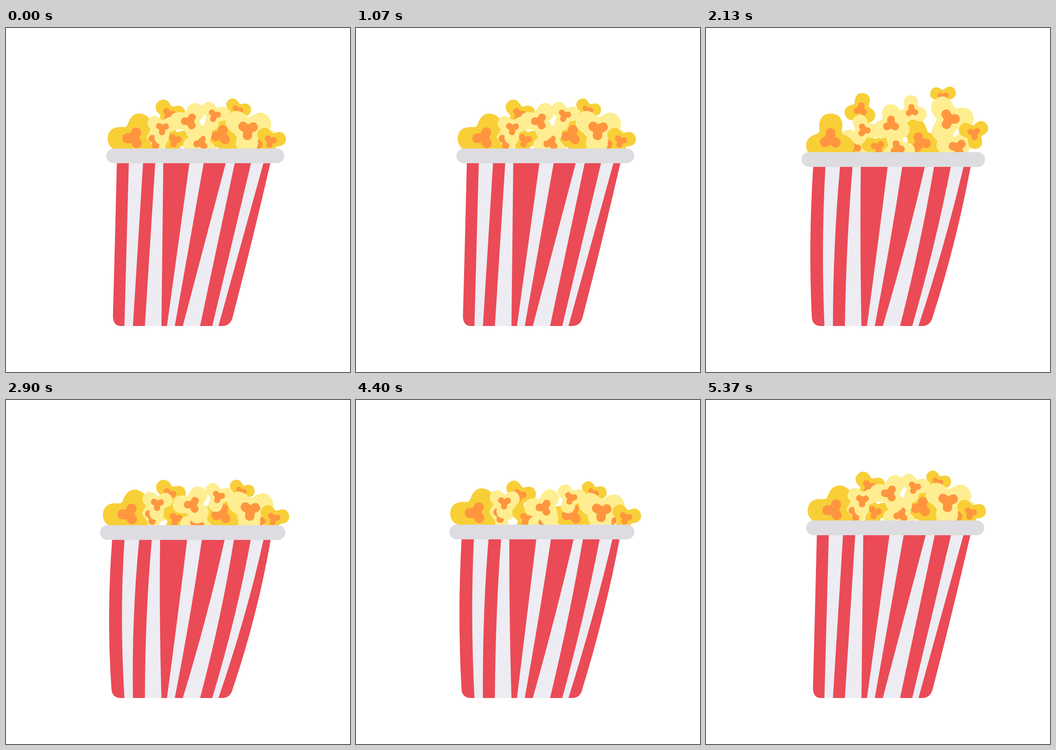
Recreate the animation shown at these times as an HTML page with a canvas. Size 748x748 px, loop 5410 ms.

```html
<!DOCTYPE html>
<html lang="en">
<head>
<meta charset="utf-8">
<title>Popcorn</title>
<style>
html, body { margin: 0; width: 100%; height: 100%; overflow: hidden; background: #fff; }
canvas { display: block; width: 748px; height: 748px; }
</style>
</head>
<body>
<canvas id="stage" width="748" height="748"></canvas>
<script>
const ctx = document.getElementById('stage').getContext('2d');
const LOOP = 5410, HOP = 1342.5;
const DARK = '#f8cf37', LIGHT = '#feee91', CORE = '#ff963f';
const RED = '#ea4b56', WHITE = '#edecf2', RIM = '#dddce1';
const RAD = Math.PI / 180;

// Moments within one hop
const START = 50, CROUCH = 330, PUSH = 373, LEAVE = 433, PEAK = 632, AIR = 685, FALL = 788, REST = 900;

const lerp = (a, b, u) => a + (b - a) * u;

// Monotone cubic through [time, value] keys: smooth, without overshoot.
function curve(keys) {
  const slope = keys.slice(1).map(([t, v], i) => (v - keys[i][1]) / (t - keys[i][0]));
  const tangent = keys.map((_, i) => {
    const a = slope[i - 1], b = slope[i];
    return a * b > 0 ? 2 * a * b / (a + b) : 0;
  });
  return t => {
    let i = 0;
    while (i < keys.length - 2 && t > keys[i + 1][0]) i++;
    const [t0, v0] = keys[i], [t1, v1] = keys[i + 1];
    const h = t1 - t0, u = (t - t0) / h, w = 1 - u;
    return lerp(v0, v1, u * u * (3 - 2 * u)) +
      h * u * w * (tangent[i] * w - tangent[i + 1] * u);
  };
}

// Cup: crouch widens and lowers it, stretch narrows and lifts it.
const crouch = curve([[0, 0], [START, 0], [CROUCH, 1], [PUSH, .75], [LEAVE, 0], [560, 0],
  [672, 1], [700, 1], [FALL, .5], [REST, 0], [HOP, 0]]);
const stretch = curve([[0, 0], [CROUCH, 0], [PUSH, .25], [LEAVE, 1], [467, 1.2], [672, 0], [HOP, 0]]);

const BASE = 648, FOOT = 628;
const tops = [241, 267, 298, 324.5, 342, 399, 430, 478, 497.5, 533, 560, 575];
const bottoms = [232, 257.5, 276, 302, 338, 350, 367, 384.5, 422, 448.5, 462, 489];

function drawCup(t) {
  const c = crouch(t), s = stretch(t);
  const y = 262 + 16 * c - 12 * s;
  const left = 218 - 21 * c + 4 * s, right = 605 + 4 * c - 11 * s;
  const top = y + 31, midY = (top + BASE) / 2 - 10 * (c + s);
  const edges = tops.map(x => {
    const u = (x - tops[0]) / (tops[11] - tops[0]);
    return x + c * lerp(-16, 1, u) + s * lerp(2, -10, u);
  });
  const bend = (a, b) => {
    const mid = (a + b) / 2;
    return mid + 20 * Math.tanh((mid - 360) / 80) * (c - s);
  };
  const footL = 232.5 - 5 * c + 2.5 * s, footR = 493 - 3 * s;

  ctx.save();
  ctx.beginPath();
  ctx.moveTo(edges[0], top);
  ctx.quadraticCurveTo(bend(edges[0], footL), midY, footL, FOOT);
  ctx.quadraticCurveTo(footL + 1, BASE, 250, BASE);
  ctx.lineTo(470, BASE);
  ctx.quadraticCurveTo(488, BASE, footR, FOOT);
  ctx.quadraticCurveTo(bend(edges[11], footR), midY, edges[11], top);
  ctx.fillStyle = RED;
  ctx.fill();
  ctx.clip();
  ctx.fillStyle = WHITE;
  for (let i = 1; i < 11; i += 2) {
    const j = i + 1;
    ctx.beginPath();
    ctx.moveTo(edges[i], top);
    ctx.quadraticCurveTo(bend(edges[i], bottoms[i]), midY, bottoms[i], BASE);
    ctx.lineTo(bottoms[j], BASE);
    ctx.quadraticCurveTo(bend(edges[j], bottoms[j]), midY, edges[j], top);
    ctx.fill();
  }
  ctx.restore();

  ctx.fillStyle = RIM;
  ctx.beginPath();
  ctx.roundRect(left, y, right - left, 32, 16);
  ctx.fill();
}

// Trefoil outline shared by every kernel and its core
const trefoil = new Path2D();
for (let d = 0; d < 360; d += 4) {
  const a = d * RAD;
  const r = .8 + .24 * Math.cos(3 * a) - .04 * Math.cos(6 * a);
  trefoil.lineTo(r * Math.cos(a), r * Math.sin(a));
}

// turn: angle of a lobe in the air; tilt: added while lying in the cup;
// rest, leave, air: places at those moments; drop: distance fallen from AIR to FALL
function kernel(color, size, turn, tilt, rest, leave, air, drop) {
  const low = [leave[0] + (leave[0] - 440) * .03, leave[1] + drop / 3];
  const path = [
    [0, rest], [START, rest],
    [CROUCH, [low[0], low[1] + 8]], [PUSH, low], [LEAVE, leave],
    [PEAK, [air[0], air[1] - .13 * drop]], [AIR, air],
    [FALL, [lerp(420, air[0], 1.1), air[1] + drop]],
    [REST, rest], [HOP, rest]
  ];
  const axis = n => curve(path.map(([t, p]) => [t, p[n]]));
  const angle = curve([[0, turn + tilt], [LEAVE, turn + tilt], [PEAK, turn], [FALL, turn],
    [REST, turn + tilt], [HOP, turn + tilt]]);
  return { color, size, angle, x: axis(0), y: axis(1) };
}

function drawKernel({ color, size, angle, x, y }, t) {
  ctx.save();
  ctx.translate(x(t), y(t));
  ctx.rotate(angle(t) * RAD);
  ctx.scale(size, size);
  ctx.fillStyle = color;
  ctx.fill(trefoil);
  ctx.scale(.43, .43);
  ctx.fillStyle = CORE;
  ctx.fill(trefoil);
  ctx.restore();
}

// Back to front
const kernels = [
  kernel(DARK, 30, -33, 25, [503, 180], [513, 194], [507, 121], 29),
  kernel(DARK, 36, -80, -48, [354, 188], [358, 180], [344, 94], 83),
  kernel(LIGHT, 41, 5, -30, [326, 246], [318, 241], [329, 234], 26),
  kernel(DARK, 53, 8, 40, [468, 233], [469, 238], [462, 217], 32),
  kernel(LIGHT, 47, -45, 15, [546, 254], [545, 258], [536, 234], 26),
  kernel(DARK, 36, -43, 30, [367, 244], [372, 250], [378, 231], 28),
  kernel(DARK, 56, -88, 25, [277, 239], [266, 227], [284, 187], 55),
  kernel(LIGHT, 39, -105, 32, [424, 250], [414, 256], [416, 235], 26),
  kernel(LIGHT, 34, -96, -35, [453, 190], [466, 198], [445, 134], 46),
  kernel(LIGHT, 43, -90, 32, [399, 203], [410, 225], [404, 182], 27),
  kernel(LIGHT, 35, 5, -31, [340, 218], [326, 207], [350, 174], 48),
  kernel(LIGHT, 53, -2, -24, [526, 221], [531, 232], [519, 166], 32),
  kernel(DARK, 34, -37, 23, [575, 246], [582, 243], [568, 189], 40)
];

function frame() {
  const t = performance.now() % LOOP % HOP;
  ctx.fillStyle = '#fff';
  ctx.fillRect(0, 0, 748, 748);
  for (const k of kernels) drawKernel(k, t);
  drawCup(t);
  requestAnimationFrame(frame);
}
frame();
</script>
</body>
</html>
```
